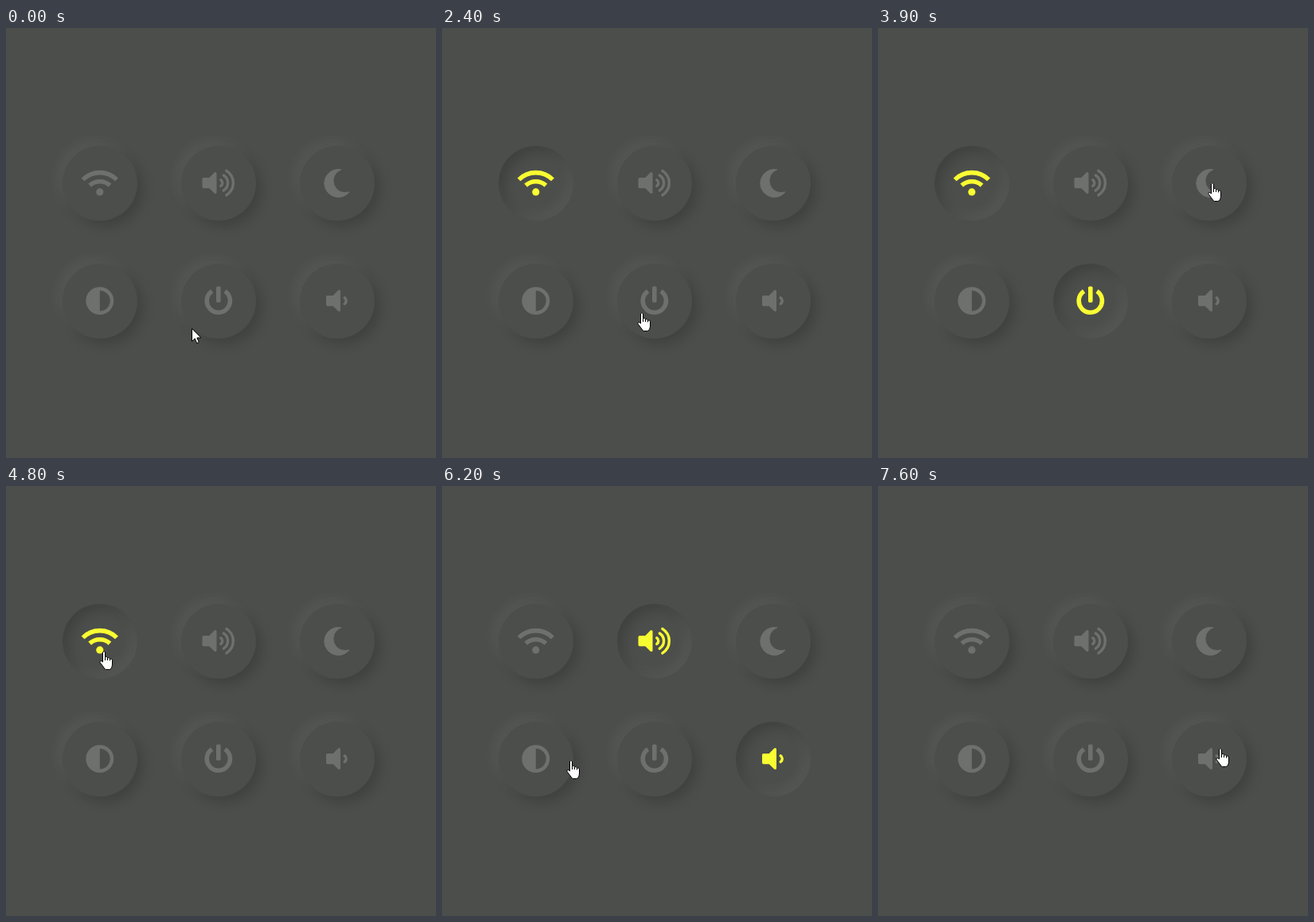
Write an HTML page that moves like this. It is 540 px wide and 540 px high and loops after 8.8 s.

```html
<!DOCTYPE html>
<html lang="en">
<head>
<meta charset="utf-8">
<title>Soft toggle buttons</title>
<style>
  html, body { margin: 0; width: 100%; height: 100%; overflow: hidden; background: #4c4e4b; }
  #stage { position: relative; width: 540px; height: 540px; overflow: hidden;
    --light: rgba(255,255,255,.055); --dark: rgba(0,0,0,.165); }
  .button { position: absolute; width: 94px; height: 94px; }
  .button > * { position: absolute; inset: 0; border-radius: 50%; }
  .up { box-shadow: -7px -7px 15px var(--light), 7px 7px 15px var(--dark); }
  .down { box-shadow: inset 7px 7px 15px var(--dark), inset -7px -7px 15px var(--light); }
  .line { fill: none; stroke: currentColor; }
  .solid { fill: currentColor; }
  .soft { fill: currentColor; stroke: currentColor; stroke-linejoin: round; }
  #cursor { position: absolute; left: 0; top: 0; overflow: visible; }
  #cursor path { fill: #fff; stroke: #000; stroke-linejoin: round; }
</style>
</head>
<body>
<div id="stage"></div>
<script>
const LOOP = 8800, STEP = 100, FADE = 300, RADIUS = 47;
const OFF = [110, 112, 110], ON = [248, 253, 50];

// Icons are drawn around 0,0; angles run clockwise from the top
function arc(cx, cy, r, from, to, width, cap = 'butt') {
  const at = deg => {
    const a = deg * Math.PI / 180;
    return `${cx + r * Math.sin(a)} ${cy - r * Math.cos(a)}`;
  };
  const large = to - from > 180 ? 1 : 0;
  return `<path class="line" stroke-width="${width}" stroke-linecap="${cap}"
    d="M${at(from)}A${r} ${r} 0 ${large} 1 ${at(to)}"/>`;
}

function wifi() {
  return arc(0, 17, 30, -45, 45, 5.6) + arc(0, 17, 18.9, -42, 42, 5.6) +
    '<circle class="solid" cy="11.3" r="4.6"/>';
}

function speaker(left, waves) {
  let s = `<path class="soft" stroke-width="3.4" transform="translate(${left})"
    d="M1.7-5H9.500L16.300-11.800V11.800L9.500 5H1.700Z"/>`;
  for (let i = 1; i <= waves; i++) s += arc(left + 20.8, 0, 6.75 * i - 2.25, 32, 148, 3.4, 'round');
  return s;
}

function moon() {
  return '<path class="soft" stroke-width="1" d="M5-16.800A17.500 17.500 0 1 0 15.200 11.300 14.500 14.500 0 0 1 5-16.800Z"/>';
}

function contrast() {
  return '<circle class="line" r="15.2" stroke-width="4.500"/><path class="solid" d="M0-13.500A13.500 13.500 0 0 0 0 13.500Z"/>';
}

function power() {
  return arc(0, 0, 14.6, 34, 326, 5.6) +
    '<rect class="solid" x="-2.8" y="-18" width="5.6" height="20.2" rx="1.7"/>';
}

const icons = [wifi(), speaker(-20.3, 3), moon(), contrast(), power(), speaker(-13.8, 1)];

// Pointer path: time, x, y, and 1 where it clicks
const stops = [
  [0, 233, 377], [200, 233, 377], [500, 4, 82], [800, 97, 340], [900, 97, 340],
  [1400, 120, 208, 1], [1700, 118, 192], [1900, 118, 192],
  [2200, 205, 377], [2400, 251, 357], [2600, 262, 345, 1], [2800, 264, 334],
  [3100, 418, 194, 1], [3550, 420, 194, 1], [4000, 420, 194],
  [4200, 382, 243], [4300, 298, 344, 1], [4800, 123, 207, 1],
  [5350, 262, 196, 1], [5700, 417, 337, 1], [5900, 417, 337],
  [6200, 162, 344], [6400, 120, 342, 1], [6600, 120, 340, 1],
  [7000, 263, 168, 1], [7300, 430, 329, 1], [LOOP, 430, 329]
];

const stage = document.getElementById('stage');
const buttons = icons.map((icon, i) => {
  const x = 118 + 149 * (i % 3), y = 195 + 148 * Math.floor(i / 3);
  const el = document.createElement('div');
  el.className = 'button';
  el.style.left = x - RADIUS + 'px';
  el.style.top = y - RADIUS + 'px';
  el.innerHTML = `<div class="up"></div><div class="down"></div>
    <svg viewBox="-46.8 -46.6 94 94">${icon}</svg>`;
  stage.append(el);
  const [up, down, svg] = el.children;
  return { x, y, up, down, svg, clicks: [] };
});

stage.insertAdjacentHTML('beforeend', `<svg id="cursor" width="20" height="26">
  <path id="arrow" d="M.5.5V16.500L4.200 13 6.700 18.800 9.300 17.700 6.900 12H11.800Z"/>
  <path id="hand" d="M-1.500 2Q0-1 1.500 2V7.500Q4 6.800 4.500 8.800 7 8 7.500 10 10.500 9.300 10.500 12V17Q10 23.500 6.500 23.500H2.500Q1 23.500.5 21.800L-5.200 14.300Q-5-11.500 -1.500 14Z"/>
</svg>`);
const handPath = 'M-1.500 14V2Q0-1 1.500 2V7.500Q4 6.800 4.500 8.800 7 8 7.500 10 10.500 9.300 10.500 12V17Q10 23.500 6.500 23.500H2.500Q1 23.500.5 21.800L-5 14.500Q-5 10.500-1.500 14ZM1.500 7.500V12M4.500 8.800V12M7.500 10V12.500';
const [cursor, arrow, hand] = ['cursor', 'arrow', 'hand'].map(id => document.getElementById(id));
hand.setAttribute('d', handPath);

const mix = (a, b, k) => a + (b - a) * k;
const over = (x, y) => buttons.find(b => Math.hypot(x - b.x, y - b.y) < RADIUS);

for (const [t, x, y, click] of stops) if (click) over(x, y).clicks.push(t);

function fade(t) {
  const k = Math.min(1, Math.max(0, t / FADE));
  return k * k * (3 - 2 * k);
}

function pointer(t) {
  const i = stops.findIndex(s => s[0] > t);
  const [t0, x0, y0] = stops[i - 1], [t1, x1, y1] = stops[i];
  const k = (t - t0) / (t1 - t0);
  return [Math.round(mix(x0, x1, k)), Math.round(mix(y0, y1, k))];
}

function draw(t) {
  const [x, y] = pointer(t);
  const hover = over(x, y);
  cursor.style.transform = `translate(${x}px, ${y}px)`;
  hand.style.display = hover ? '' : 'none';
  arrow.style.display = hover ? 'none' : '';
  for (const b of buttons) {
    // Every second click releases the button
    const k = b.clicks.reduce((sum, c, i) => sum + (i % 2 ? -1 : 1) * fade(t - c), 0);
    b.up.style.opacity = 1 - k;
    b.down.style.opacity = k;
    b.svg.style.color = `rgb(${OFF.map((c, i) => Math.round(mix(c, ON[i], k)))})`;
  }
}

const start = performance.now();
function tick() {
  const t = (performance.now() - start) % LOOP;
  draw(Math.floor(t / STEP) * STEP);
  requestAnimationFrame(tick);
}
tick();
</script>
</body>
</html>
```
